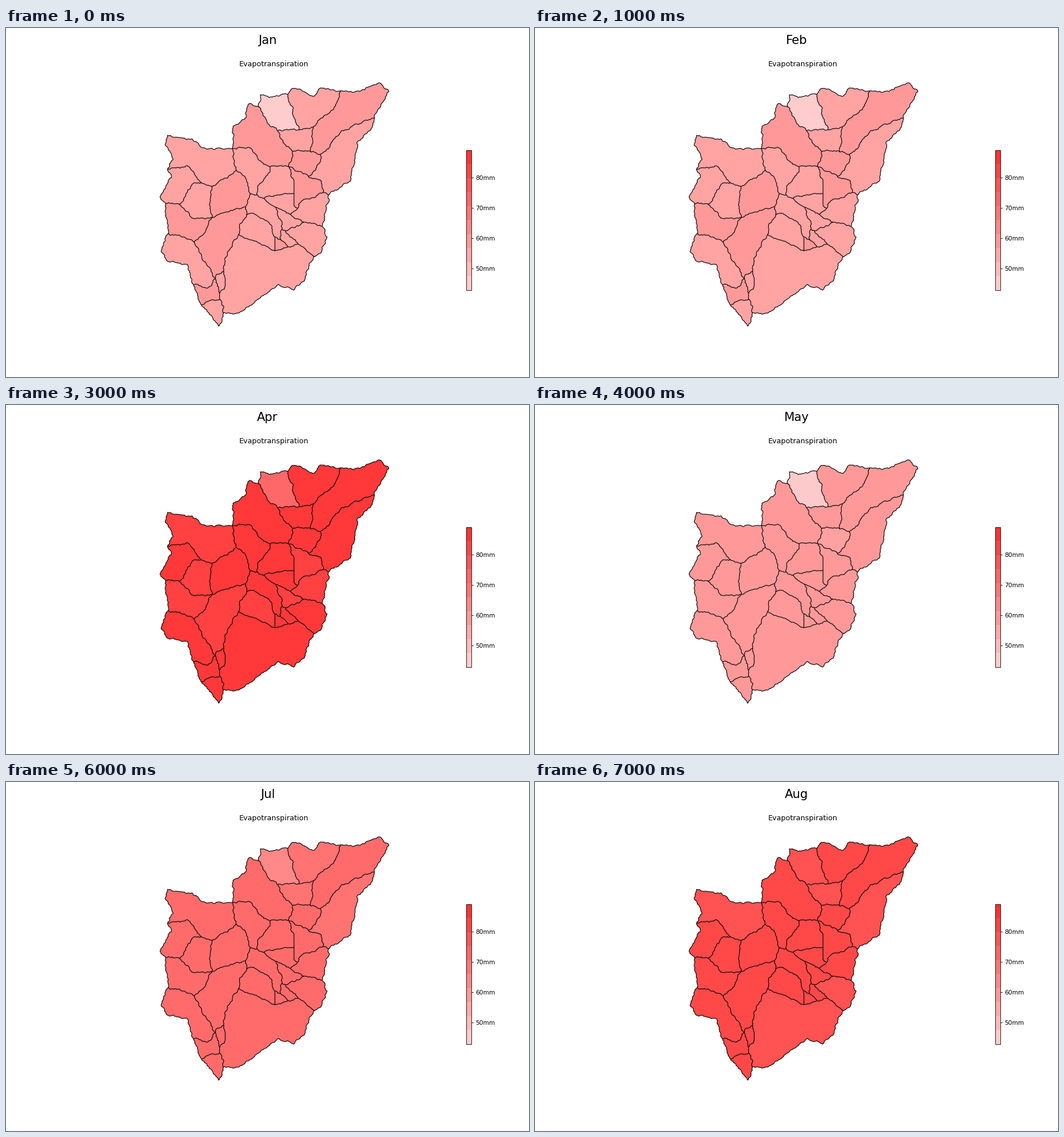
A matplotlib script for the animation above (8 s loop, 917 by 611 pixels).

```python
from itertools import combinations

import numpy as np
import matplotlib.pyplot as plt
from matplotlib.animation import FuncAnimation
from matplotlib.collections import LineCollection
from matplotlib.patches import Polygon, Rectangle

W, H, DPI = 917, 611, 64
PT = 72 / DPI          # points per pixel
rng = np.random.default_rng(5)
plt.rcParams["font.family"] = "DejaVu Sans"

# Junctions, named by the regions that meet there ('-' is outside).
# Two regions that share two junctions have a border between them.
JUNCTIONS = {
    "-AP": (443, 138), "APH": (476, 180), "-PC": (494, 116), "PCH": (514, 178),
    "-CD": (587, 110), "CDH": (539, 173), "-DE": (646, 157), "DEI": (551, 222),
    "DHI": (534, 217), "AHI": (503, 216), "AIGK": (495, 242), "EGI": (530, 260),
    "EFG": (556, 288), "-EF": (565, 292), "AJK": (463, 243), "-ABJ": (397, 211),
    "JKN": (440, 292), "GKM": (505, 290), "BJL": (404, 249), "JLN": (428, 291),
    "KMN": (452, 298), "FGM": (511, 316), "FMQ": (498, 326), "MNQ": (473, 314),
    "LNW": (420, 313), "-FR": (554, 347), "FQR": (522, 340), "QRS": (490, 355),
    "NQS": (484, 352), "NST": (482, 371), "RSV": (512, 378), "STV": (494, 383),
    "TUV": (471, 390), "NTU": (471, 366), "-RV": (541, 400), "NUW": (422, 327),
    "UVW": (408, 361), "BLc": (361, 277), "Bbc": (343, 271), "-Bb": (283, 248),
    "-ab": (280, 308), "abc": (303, 308), "LWac": (361, 332), "OWa": (330, 375),
    "-Oa": (284, 360), "OWXY": (367, 439), "VWX": (382, 427), "VXY": (374, 465),
    "VYZ": (374, 475), "-OY": (329, 450), "-YZ": (343, 485), "-VZ": (381, 499),
}

# Main bends of the outline and of the inner borders.
OUTLINE = {
    "-A": [(398, 172), (418, 160), (427, 132)],
    "-P": [(446, 117), (467, 121)],
    "-C": [(500, 107), (541, 119), (551, 105)],
    "-D": [(620, 111), (655, 96), (671, 112), (656, 139)],
    "-E": [(640, 176), (617, 198), (604, 268), (586, 279)],
    "-R": [(563, 366), (553, 392)],
    "-V": [(519, 445), (504, 459), (478, 449), (428, 486), (405, 499)],
    "-Z": [(373, 522)],
    "-O": [(318, 414), (285, 409), (272, 392)],
    "-b": [(270, 296), (290, 262)],
    "-B": [(293, 230), (279, 204), (283, 188), (326, 194), (352, 212)],
}
INNER = {
    "AP": [(462, 170)], "PC": [(503, 145)], "CD": [(575, 140)], "DE": [(588, 180)],
    "AH": [(488, 203)], "EI": [(548, 238)], "EG": [(553, 268)], "GK": [(505, 268)],
    "AJ": [(426, 209), (452, 239)], "JK": [(463, 252), (445, 272)],
    "JL": [(419, 260)], "FG": [(518, 303)], "GM": [(505, 311)], "NQ": [(481, 335)],
    "NU": [(465, 345), (435, 325)], "UW": [(411, 342)], "Bb": [(318, 241)],
    "bc": [(331, 271)], "ac": [(326, 333)], "Lc": [(358, 300)], "LW": [(375, 325)],
    "Wa": [(350, 355)], "Oa": [(310, 366)], "OW": [(343, 400)], "VW": [(388, 395)],
    "VX": [(383, 457)], "WX": [(370, 431)], "OY": [(354, 455)], "YZ": [(362, 476)],
    "VZ": [(382, 488)],
}
BENDS = {frozenset(k): v for k, v in {**OUTLINE, **INNER}.items()}


def rough(p, q):
    """Fractal line from p to q, without q; upright lines stay straight."""
    d = q - p
    size = np.hypot(*d)
    if size < 3 or d[0] == 0:
        return [p]
    push = rng.uniform(-1, 1) * min(0.2 * size, 2)
    mid = (p + q) / 2 + push * np.array([-d[1], d[0]]) / size
    return rough(p, mid) + rough(mid, q)


def border(pair, start, end):
    bends = [np.array(b, float) for b in BENDS.get(pair, [])]
    if bends and np.hypot(*(bends[0] - start)) > np.hypot(*(bends[0] - end)):
        start, end = end, start
    knots = [start, *bends, end]
    pts = [pt for p, q in zip(knots, knots[1:]) for pt in rough(p, q)]
    return np.array(pts + [end])


def ring(name):
    """Join all borders of a region into one outline."""
    parts = [line for pair, line in borders.items() if name in pair]
    path = parts.pop(0)
    while parts:
        tip = path[-1]
        i = next(i for i, p in enumerate(parts)
                 if (p[0] == tip).all() or (p[-1] == tip).all())
        part = parts.pop(i)
        if (part[-1] == tip).all():
            part = part[::-1]
        path = np.vstack([path, part[1:]])
    return path


names = sorted(set("".join(JUNCTIONS)))
borders = {}
for pair in combinations(names, 2):
    ends = [np.array(xy, float) for k, xy in JUNCTIONS.items() if set(pair) <= set(k)]
    if len(ends) == 2:
        borders[frozenset(pair)] = border(frozenset(pair), *ends)

fig = plt.figure(figsize=(W / DPI, H / DPI), dpi=DPI, facecolor="white")
ax = fig.add_axes([0, 0, 1, 1])
ax.set(xlim=(0, W), ylim=(H, 0))
ax.axis("off")

patches = {n: ax.add_patch(Polygon(ring(n), lw=0)) for n in names if n != "-"}
ax.add_collection(LineCollection(list(borders.values()), colors="black",
                                 linewidths=1.15 * PT, zorder=3))

# colour bar
X0, X1, TOP, BOTTOM, BANDS = 806.5, 815.5, 213.5, 458.5, 10
step = (BOTTOM - TOP) / BANDS
for i in range(BANDS):
    level = np.interp(i, (0, BANDS - 1), (0.2, 0.8))
    ax.add_patch(Rectangle((X0, TOP + i * step), X1 - X0, step,
                           fc=(1, level, level), lw=0, aa=False))
ax.add_patch(Rectangle((X0, TOP), X1 - X0, BOTTOM - TOP, fill=False,
                       ec="black", lw=0.85 * PT, zorder=3))
for mm in range(50, 90, 10):
    y = 262 + 5.31 * (80 - mm)
    ax.plot([X1, X1 + 3.7], [y, y], color="black", lw=0.85 * PT)
    ax.text(X1 + 7.9, y, f"{mm}mm", fontsize=10.61 * PT, va="center_baseline")

ax.text(469.6, 67, "Evapotranspiration", fontsize=12.73 * PT, ha="center")
title = fig.suptitle("", y=0.98, fontsize=21.2 * PT)

# month, common shade, then shades of the regions that differ
winter = ("#ffa3a3", {"#ff9999": "ADIGLWaYT", "#fecccc": "P"})
MONTHS = [
    ("Jan", *winter),
    ("Feb", *winter),
    ("Mar", "#ff6464", {"#ff5c5c": "B", "#ff7575": "CD", "#ff8080": "H", "#ffafaf": "P"}),
    ("Apr", "#ff3939", {"#ff4141": "WacFGUBQ", "#ff6868": "P"}),
    ("May", "#ff9999", {"#ffa1a1": "I", "#fccaca": "P"}),
    ("Jun", "#ff8888", {"#ff9292": "CHIEMQWXZ", "#ffadad": "P"}),
    ("Jul", "#ff6b6b", {"#ff7373": "CHE", "#ff8888": "P"}),
    ("Aug", "#ff4949", {"#ff5252": "BEVRPH"}),
]


def draw(frame):
    month, base, special = MONTHS[frame]
    title.set_text(month)
    for patch in patches.values():
        patch.set_facecolor(base)
    for shade, group in special.items():
        for n in group:
            patches[n].set_facecolor(shade)
    return [title, *patches.values()]


anim = FuncAnimation(fig, draw, frames=len(MONTHS), interval=1000,
                     repeat=True, repeat_delay=0, blit=False)
plt.show()
```
